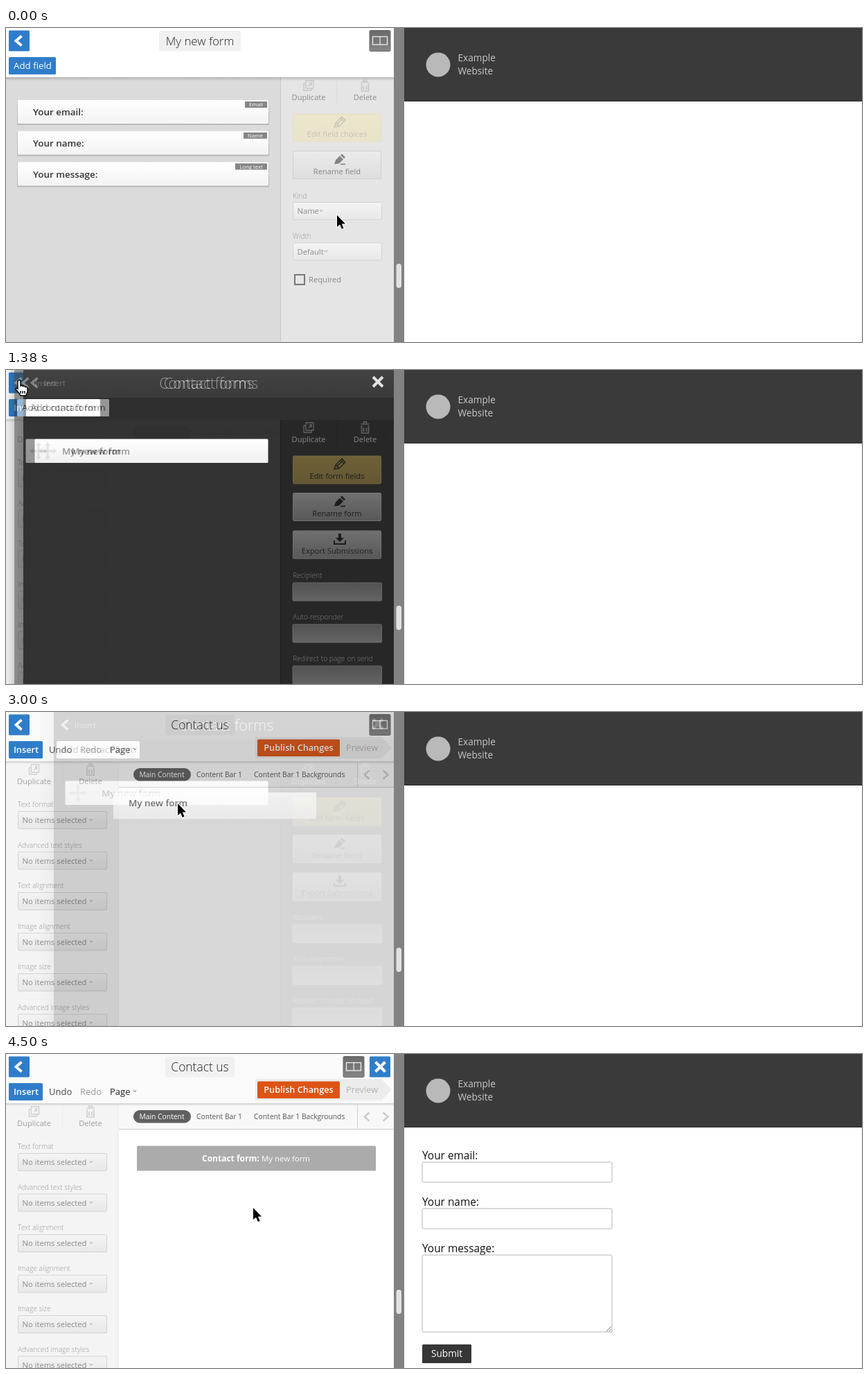
Write an HTML page with a canvas that moves like this. It is 1236 px wide and 453 px high and loops after 6500 ms.

```html
<!DOCTYPE html>
<html lang="en">
<head>
<meta charset="utf-8">
<title>Contact form builder</title>
<style>
  html, body { margin: 0; width: 100%; height: 100%; overflow: hidden; background: #fff; }
  canvas { display: block; width: 1236px; height: 453px; }
</style>
</head>
<body>
<canvas width="1236" height="453"></canvas>
<script>
const canvas = document.querySelector('canvas');
const buffer = canvas.cloneNode().getContext('2d');
let ctx = canvas.getContext('2d');
const LOOP = 6500, BLUE = '#2f7dca';

const PATHS = {
  duplicate: 'M-4-7H7V4H-4ZM-4-3H-7V7H4V4M0 1L4-4M1-4H4V0',
  trash: 'M-6-5H6M-2-5V-8H2V-5M-5-3V8H5V-3M-2 0V6M2 0V6',
  pencil: 'M-8 8L-6 2L3-7L8-2L-1 7ZM1-5L6 0M-6 2L-1 7M-4 4L5-5',
  pencilBody: 'M-8 7L-6 1L0-5L5 0L-1 6ZM1-6L3-8L8-3L6-1Z',
  underline: 'M1 7H8',
  download: 'M-2-8H2V-2H6L0 4L-6-2H-2Z',
  tray: 'M-8 2V7H8V2',
  cross: 'M-7-7L7 7M7-7L-7 7',
  left: 'M4-7L-4 0L4 7',
  right: 'M-4-7L4 0L-4 7',
  caret: 'M-3-1.5H3L0 1.5Z',
  moveLines: 'M-9 0H9M0-9V9',
  moveHeads: 'M0-13L4-8H-4ZM13 0L8 4V-4ZM0 13L4 8H-4ZM-13 0L-8 4V-4Z',
  arrow: 'M0 0V17L4 13.4L6.8 20L9.6 18.8L6.8 12.4H12Z',
  hand: 'M5 2.5a2 2 0 0 1 4 0V9c1-1 3-1 3.4.5c1-.8 3-.5 3.3 1c1.3-.6 3.3 0 3.3 2V17c0 2-2 3-2 6H9c-1-3-4-5-6.5-8.5c-1-2 1-3 2.5-1.5z'
};
for (const name in PATHS) PATHS[name] = new Path2D(PATHS[name]);

// Pointer stops: step, x, y
const POINTER = [
  [0, 478, 270], [1, 462, 260], [2, 330, 180], [3, 130, 60], [4, 35, 8], [6, 15, 14],
  [11, 15, 14], [12, 45, 28], [13, 110, 60], [15, 236, 118], [16, 250, 123],
  [17, 238, 122], [18, 215, 121], [20, 190, 120], [22, 186, 120],
  [25, 279, 138], [28, 300, 145], [31, 304, 152], [34, 350, 212], [36, 357, 222]
];
const PANEL_LEFT = [25, 45, 57, 64, 68, 69];
const HEADER_ALPHA = [1, 1, .8, .45, .13, .6];

function at(x, y, paint) {
  ctx.save();
  ctx.translate(x, y);
  paint();
  ctx.restore();
}

// Paints a group off screen, then lays it over the stage as one picture
function blend(alpha, paint) {
  const stage = ctx;
  ctx = buffer;
  ctx.clearRect(0, 0, 1236, 453);
  paint();
  ctx = stage;
  ctx.globalAlpha = alpha;
  ctx.drawImage(buffer.canvas, 0, 0);
  ctx.globalAlpha = 1;
}

function box(x, y, w, h, top, bottom = top, border, radius = 1.5) {
  const fill = ctx.createLinearGradient(0, y, 0, y + h);
  fill.addColorStop(0, top);
  fill.addColorStop(1, bottom);
  ctx.fillStyle = fill;
  ctx.beginPath();
  ctx.roundRect(x, y, w, h, radius);
  ctx.fill();
  if (!border) return;
  ctx.strokeStyle = border;
  ctx.lineWidth = 1;
  ctx.stroke();
}

function rect(x, y, w, h, color) {
  ctx.fillStyle = color;
  ctx.fillRect(x, y, w, h);
}

function circle(x, y, r, color) {
  ctx.fillStyle = color;
  ctx.beginPath();
  ctx.arc(x, y, r, 0, 7);
  ctx.fill();
}

// y is the middle of the capitals
function text(s, x, y, size, color, weight = 400, align = 'left') {
  ctx.font = `${weight} ${size}px "Open Sans", sans-serif`;
  ctx.textAlign = align;
  ctx.fillStyle = color;
  ctx.fillText(s, x, y + size * .36);
}

function centered(s, x, y, size, color, weight) {
  text(s, x, y, size, color, weight, 'center');
}

function icon(name, x, y, color, width, scale = 1) {
  at(x, y, () => {
    ctx.scale(scale, scale);
    ctx.fillStyle = ctx.strokeStyle = color;
    ctx.lineWidth = width;
    if (width) ctx.stroke(PATHS[name]); else ctx.fill(PATHS[name]);
  });
}

function shadowDown(y, h, alpha) {
  box(0, y, 560, h, `rgba(0,0,0,${alpha})`, 'rgba(0,0,0,0)', null, 0);
}

function backButton() {
  box(4, 3.5, 30, 30, BLUE);
  icon('left', 18.5, 18.5, '#fff', 3.8);
}

function splitButton(x) {
  box(x, 3.5, 30, 30, '#6a6a6a', '#858585', '#6a6a6a');
  ctx.strokeStyle = '#eee';
  ctx.lineWidth = 1.3;
  ctx.strokeRect(x + 4.5, 12.5, 21, 11.5);
  rect(x + 14.5, 12.5, 1.2, 11.5, '#eee');
}

function title(s, x, w, size) {
  box(x, 4, w, 29.5, '#f1f1f1', '#f1f1f1', null, 3);
  centered(s, x + w / 2, 19, size, '#222', 300);
}

function itemTools(x, iconColor, textColor) {
  icon('duplicate', x, 83, iconColor, 1.3);
  icon('trash', x + 81.5, 83, iconColor, 1.6);
  centered('Duplicate', x, 100, 11.1, textColor);
  centered('Delete', x + 81.5, 100, 11.1, textColor);
}

function select(x, y, w, value, caretX) {
  box(x + .5, y + .5, w - 1, 25, '#f4f4f4', '#e8e8e8', '#d3d3d3');
  text(value, x + 6.5, y + 13, 11.2, '#8a8a8a');
  icon('caret', caretX, y + 13, '#c4c4c4');
}

function sideButton(y, label, iconName, colors, ink) {
  box(414.5, y, 127, 40, ...colors);
  if (iconName === 'pencil') icon('pencil', 482, y + 11, ink, 1.3);
  if (iconName === 'rename') {
    icon('pencilBody', 482, y + 12, ink);
    icon('underline', 482, y + 12, ink, 1.6);
  }
  if (iconName === 'export') {
    icon('download', 482, y + 12, ink);
    icon('tray', 482, y + 12, ink, 2);
  }
  centered(label, 478, y + 29, 11.2, ink);
}

function formEditor() {
  rect(0, 0, 560, 453, '#fff');
  rect(0, 71, 396, 382, '#dbdbdb');
  rect(396, 71, 164, 382, '#e5e5e5');
  rect(396, 71, 1, 382, '#cbc8c5');
  rect(477, 72, 1, 36, '#dcdcdc');
  shadowDown(71, 5, .2);
  backButton();
  title('My new form', 221, 118, 16.9);
  splitButton(525);
  box(4, 42, 68, 25, BLUE);
  centered('Add field', 38.5, 54, 13.3, '#fff');

  [['Your email:', 'Email', 32], ['Your name:', 'Name', 34], ['Your message:', 'Long text', 46]]
    .forEach(([label, kind, w], i) => {
      const y = 104 + i * 44.7;
      box(16, y + 1, 364, 35, 'rgba(0,0,0,.08)', 'rgba(0,0,0,.16)');
      box(17, y, 362, 34, '#fff', '#f3f3f3');
      text(label, 39, y + 17.5, 13.4, '#333', 600);
      rect(377 - w, y + 2, w, 9, '#858585');
      centered(kind, 377 - w / 2, y + 6.5, 7.8, '#fff');
    });

  itemTools(437, '#c6c6c6', '#8c8c8c');
  sideButton(124, 'Edit field choices', 'pencil', ['#ece6cc', '#e9e3c9', '#e3dec8'], '#c4c1b4');
  sideButton(177.5, 'Rename field', 'rename', ['#ebebeb', '#dedede', '#cfcfcf'], '#858585');
  text('Kind', 414, 242, 10.2, '#999', 300);
  select(414, 251, 129, 'Name', 455);
  text('Width', 414, 300.5, 10.2, '#999', 300);
  select(414, 309.5, 129, 'Default', 462);
  ctx.strokeStyle = '#777';
  ctx.lineWidth = 2;
  ctx.strokeRect(417, 356, 14, 14);
  text('Required', 437, 362.5, 11.2, '#8a8a8a');
}

function pageEditor(closable) {
  rect(0, 0, 560, 453, '#fff');
  rect(0, 0, 560, 72, '#fafafa');
  rect(0, 72, 163, 381, '#f4f4f4');
  rect(163, 72, 397, 36, '#f8f8f8');
  rect(163, 108, 397, 1, '#ccc');
  rect(162, 72, 1, 381, '#eee');
  rect(81, 73, 1, 35, '#ebebeb');
  shadowDown(71, 4, .17);
  backButton();
  title('Contact us', 230, 100, 17.4);
  splitButton(closable ? 487 : 525);
  if (closable) {
    box(525, 3.5, 30, 30, BLUE);
    icon('cross', 540.5, 18.5, '#fff', 4);
  }
  box(4, 42, 49, 25, BLUE);
  centered('Insert', 29, 54, 12.8, '#fff', 600);
  text('Undo', 62, 54, 13, '#444');
  text('Redo', 107, 54, 13, '#999');
  text('Page', 150, 54, 13, '#222');
  icon('caret', 186, 54, '#aaa');

  ctx.fillStyle = '#ececec';
  ctx.fill(new Path2D('M360 36H542L557 51.5L542 67H360Z'));
  box(363, 39.5, 119, 24.5, '#dd5414');
  centered('Publish Changes', 422.5, 51.5, 12.7, '#fff', 600);
  text('Preview', 491, 51.5, 12.8, '#b4b4b4');

  box(184, 81, 83, 18.5, '#606060', '#606060', null, 9.2);
  centered('Main Content', 225, 90, 10.3, '#fff');
  text('Content Bar 1', 275, 90, 10.25, '#555');
  text('Content Bar 1 Backgrounds', 358, 90, 10.3, '#555');
  rect(507, 72, 1, 36, '#d0d0d0');
  icon('left', 521, 90.5, '#ccc', 3, .85);
  icon('right', 548, 90.5, '#ccc', 3, .85);

  itemTools(40.5, '#cfcfcf', '#a0a0a0');
  ['Text format', 'Advanced text styles', 'Text alignment', 'Image alignment', 'Image size', 'Advanced image styles']
    .forEach((label, i) => {
      const y = 133.5 + i * 58.5;
      text(label, 17, y, 10.2, '#999', 300);
      select(17, y + 9.5, 129, 'No items selected', 123);
    });
}

function formsPanel(left) {
  const shade = ctx.createLinearGradient(left - 22, 0, left, 0);
  shade.addColorStop(0, 'rgba(0,0,0,0)');
  shade.addColorStop(1, 'rgba(0,0,0,.16)');
  rect(left - 22, 0, 22, 453, shade);
  box(left, 0, 560 - left, 40, '#424242', '#3b3b3b', null, 0);
  rect(left, 40, 560 - left, 32, '#2f2f2f');
  rect(left, 72, 396 - left, 381, 'rgba(47,47,47,.96)');
  rect(396, 72, 164, 381, 'rgba(36,36,36,.96)');
  rect(396, 72, 1, 381, '#1d1d1d');

  icon('left', left + 16.5, 18.5, '#ccc', 3.4);
  text('Insert', left + 30, 19, 11.4, '#aaa');
  centered('Contact forms', (left + 560) / 2 + 3.5, 19, 21.5, '#eee', 300);
  icon('cross', 537, 17, '#e2e2e2', 4);
  box(left + 4, 42, 120, 25, '#fff');
  text('Add contact form', left + 11, 54, 13.3, '#333');

  box(left + 16.5, 99.5, 362 - left, 34.5, '#fff', '#f0f0f0');
  icon('moveLines', left + 35, 117, '#ccc', 3);
  icon('moveHeads', left + 35, 117, '#ccc');
  text('My new form', left + 69, 117, 13.4, '#333', 600);

  itemTools(437, '#626262', '#868686');
  rect(477, 72, 1, 36, '#232323');
  const grey = ['#707070', '#585858', '#747474'];
  sideButton(124, 'Edit form fields', 'pencil', ['#6e6137', '#635733', '#71663f'], '#1c1c1c');
  sideButton(177.5, 'Rename form', 'rename', grey, '#1c1c1c');
  sideButton(232, 'Export Submissions', 'export', grey, '#1c1c1c');
  ['Recipient', 'Auto-responder', 'Redirect to page on send'].forEach((label, i) => {
    const y = 296.5 + i * 60;
    text(label, 414, y, 10.3, '#7c7c7c', 300);
    box(414, y + 10.5, 128.5, 26, '#525252', '#646464', '#6a6a6a');
  });
}

function dropLine() {
  rect(180, 127.7, 363, 2.8, '#1f4fdd');
  circle(179.5, 129, 3.6, '#1f4fdd');
  circle(543.5, 129, 3.6, '#1f4fdd');
}

function draggedItem(x, y) {
  box(x, y, 293, 38.5, '#fff', '#f3f3f3');
  rect(x, y + 38, 293, 1, '#ddd');
  text('My new form', x + 22, y + 15, 13.4, '#333', 600);
}

function droppedForm() {
  box(189, 132.5, 345, 36, '#ababab');
  text('Contact form:', 283, 150.5, 12, '#fff', 700);
  text('My new form', 369, 150.5, 11.4, '#fff');
}

function previewHeader() {
  rect(575, 0, 661, 105, '#3a3a3a');
  rect(575, 105, 661, 1, '#2a2a2a');
  circle(624, 53, 17.5, '#b9b9b9');
  text('Example', 652.5, 43.5, 13.6, '#c8c8c8');
  text('Website', 652.5, 62, 13.6, '#c8c8c8');
}

function previewForm() {
  [['Your email:', 146, 29], ['Your name:', 213, 29], ['Your message:', 280, 111]]
    .forEach(([label, y, h]) => {
      text(label, 601, y, 15.4, '#111');
      box(601, y + 10, 274, h, '#fff', '#fff', '#b5b5b5');
    });
  ctx.strokeStyle = '#777';
  ctx.stroke(new Path2D('M867 400L874 393M871 400L874 397'));
  box(601, 419, 71, 27, '#363636');
  centered('Submit', 636.5, 432.5, 13.6, '#fff');
}

function gutter() {
  rect(560, 0, 15, 453, '#828282');
  box(563.5, 340, 7.5, 35, '#e2e2e2', '#e2e2e2', null, 3.7);
}

function pointerAt(step) {
  const next = POINTER.findIndex(stop => stop[0] > step);
  if (next < 0) return POINTER.at(-1).slice(1);
  const [s0, x0, y0] = POINTER[next - 1], [s1, x1, y1] = POINTER[next];
  const p = (step - s0) / (s1 - s0);
  return [x0 + (x1 - x0) * p, y0 + (y1 - y0) * p];
}

function arrow(x, y) {
  at(x, y, () => {
    ctx.strokeStyle = '#fff';
    ctx.lineWidth = 2;
    ctx.stroke(PATHS.arrow);
    ctx.fillStyle = '#000';
    ctx.fill(PATHS.arrow);
  });
}

function hand() {
  at(12, 14, () => {
    ctx.fillStyle = '#fff';
    ctx.fill(PATHS.hand);
    ctx.strokeStyle = '#000';
    ctx.lineWidth = 1.4;
    ctx.stroke(PATHS.hand);
    ctx.stroke(new Path2D('M9 16V20M12 16V20M15 16V20'));
  });
}

function pointer(step, x, y) {
  if (step >= 8 && step < 12) return hand();
  if (step === 4) blend(.15, () => arrow(x + 13, y));
  arrow(x, y);
  if (step === 7) blend(.5, hand);
}

function draw(step) {
  const [x, y] = pointerAt(step);
  rect(0, 0, 1236, 453, '#fff');
  blend(HEADER_ALPHA[step] ?? 1, previewHeader);
  rect(1235, 106, 1, 347, '#eee');

  if (step < 11) formEditor();
  else pageEditor(step >= 33);

  if (step >= 11 && step < 23) formsPanel(PANEL_LEFT[Math.min(step - 11, 5)]);
  if (step === 11) blend(.5, () => formsPanel(12));
  if (step === 23) blend(.7, () => formsPanel(69));
  if (step === 24) blend(.2, () => formsPanel(69));

  if (step >= 25 && step < 32) dropLine();
  if (step >= 23 && step < 32) blend(.68, () => draggedItem(x - 93, y - 16));
  if (step >= 32) droppedForm();
  if (step >= 33) blend(step === 33 ? .5 : 1, previewForm);

  gutter();
  pointer(step, x, y);
}

// Eight steps per second, on hundredths: 0, 130, 250, 380 ms ...
function frame(now) {
  const t = now % LOOP;
  draw(Math.floor(t / 250) * 2 + (t % 250 >= 130 ? 1 : 0));
  requestAnimationFrame(frame);
}
requestAnimationFrame(frame);
</script>
</body>
</html>
```
